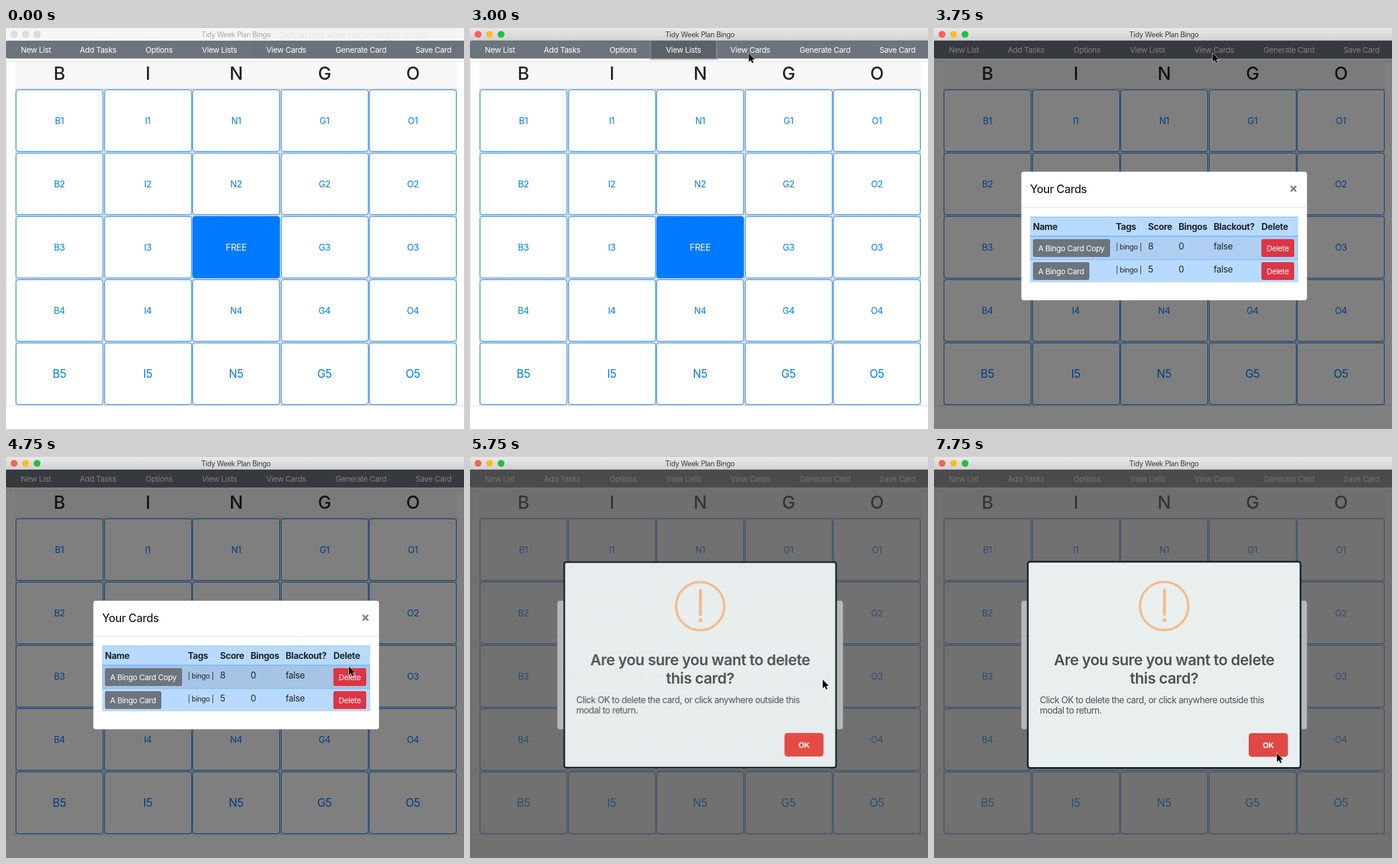
These frames come from a looping animation (796x697 px, 8000 ms). An HTML page:

```html
<!DOCTYPE html>
<html lang="en">
<head>
<meta charset="utf-8">
<title>Bingo cards</title>
<style>
html, body { margin: 0; width: 100%; height: 100%; overflow: hidden; background: #fff; }
svg { display: block; width: 796px; height: 697px; font-family: Inter, "Open Sans", sans-serif; letter-spacing: -.025em; }
.mid { text-anchor: middle; }
.s12 { font-size: 12.5px; }
.s14 { font-size: 13.6px; }
.s16 { font-size: 15.5px; }
.s20 { font-size: 19.4px; }
.s32 { font-size: 31px; font-weight: 500; }
.bold { font-weight: 700; }

/* every pose holds until the next one; one loop is 8 s, 3.125% = 250 ms */
.anim { animation: 8s step-end infinite; }
#hint { animation-name: hint; }
#active { animation-name: active; }
#lists { animation-name: lists; }
#cards { animation-name: cards; }
#backdrop { animation-name: backdrop; }
#modal { animation-name: modal; }
#rowHover { animation-name: rowHover; }
#del { animation-name: del; }
#overlay { animation-name: overlay; }
#alert { animation-name: alert; transform-origin: 400px 361px; }
#ok { animation-name: ok; }
#cursor { animation-name: cursor; }

@keyframes hint {
  0% { opacity: 1; } 3.125% { opacity: .8; } 6.25% { opacity: .6; }
  9.375% { opacity: .4; } 12.5% { opacity: .2; } 15.625%, 100% { opacity: 0; }
}
@keyframes active { 0% { opacity: 0; } 28.125%, 100% { opacity: 1; } }
@keyframes lists { 0% { opacity: 0; } 28.125% { opacity: 1; } 40.625%, 100% { opacity: 0; } }
@keyframes cards { 0% { opacity: 0; } 40.625% { opacity: 1; } 46.875%, 100% { opacity: 0; } }
@keyframes backdrop { 0% { opacity: 0; } 40.625%, 100% { opacity: .5; } }
@keyframes modal {
  0% { opacity: 0; transform: translateY(-50px); }
  43.75% { opacity: .97; transform: translateY(-1px); }
  46.875%, 100% { opacity: 1; transform: none; }
}
@keyframes rowHover { 0% { opacity: 0; } 59.375%, 100% { opacity: .05; } }
@keyframes del { 0% { fill: #dc3545; } 62.5%, 100% { fill: #c82333; } }
@keyframes overlay { 0% { opacity: 0; } 68.75% { opacity: .02; } 71.875%, 100% { opacity: .45; } }
@keyframes alert {
  0% { opacity: 0; transform: scale(.7); }
  68.75% { opacity: .03; transform: scale(.7); }
  71.875% { opacity: .99; transform: scale(.997); }
  75%, 100% { opacity: 1; transform: none; }
}
@keyframes ok { 0% { fill: #e84a44; } 93.75%, 100% { fill: #e04843; } }
@keyframes cursor {
  0% { opacity: 0; transform: translate(500px, 56px); }
  18.75% { opacity: 1; transform: translate(500px, 56px); }
  21.875% { opacity: 1; transform: translate(484.5px, 44px); }
  53.125% { transform: translate(490px, 68px); }
  56.25% { transform: translate(536px, 205px); }
  59.375% { transform: translate(596px, 364px); }
  62.5% { transform: translate(611px, 386px); }
  65.625% { transform: translate(613px, 387px); }
  84.375% { transform: translate(612px, 393px); }
  87.5% { transform: translate(606px, 432px); }
  90.625% { transform: translate(600px, 482px); }
  93.75% { transform: translate(597px, 509px); }
  96.875%, 100% { opacity: 1; transform: translate(596px, 515px); }
}
</style>
</head>
<body>
<svg viewBox="0 0 796 697">
  <defs>
    <linearGradient id="bar" x2="0" y2="1">
      <stop offset="0" stop-color="#e9e9e9"/><stop offset="1" stop-color="#d1d1d1"/>
    </linearGradient>
  </defs>

  <rect width="796" height="697" fill="#fff"/>
  <rect y="22" width="800" height="31" rx="3" fill="#6c757d"/>
  <g id="lists" class="anim">
    <rect x="312" y="19" width="119" height="37" rx="3" fill="#828a91" fill-opacity=".5"/>
    <rect x="315" y="22" width="112" height="31" fill="#5a6268"/>
  </g>
  <g id="cards" class="anim">
    <rect x="424" y="19" width="126" height="37" rx="3" fill="#828a91" fill-opacity=".5"/>
    <rect x="427" y="22" width="120" height="31" fill="#5a6268"/>
  </g>
  <g id="nav" class="mid s14" fill="#fff"></g>

  <rect x=".5" y="58.5" width="802" height="598" rx="4" fill="#fff" stroke="#dfdfdf"/>
  <rect x="16" y="59" width="768" height="47" fill="#f7f7f7"/>
  <rect x="16" y="105" width="768" height="551" fill="#dcdcdc"/>
  <g id="grid" class="mid"></g>

  <rect id="backdrop" class="anim" y="22" width="796" height="675"/>

  <g id="modal" class="anim" fill="#212529">
    <rect x="151.5" y="249.5" width="497" height="224" rx="4.5" fill="#fff" stroke="#000" stroke-opacity=".2"/>
    <text x="167" y="287" class="s20" font-weight="500">Your Cards</text>
    <path d="M620 274.500l9.500 9.500m0-9.500l-9.500 9.500" stroke="#7f7f7f" stroke-width="3"/>
    <rect x="152" y="311" width="497" height="1" fill="#dee2e6"/>
    <rect x="167" y="328" width="466" height="114" fill="#b8daff"/>
    <rect x="167" y="362" width="466" height="40" fill-opacity=".05" fill="#000"/>
    <rect id="rowHover" class="anim" x="167" y="362" width="466" height="40" fill="#000"/>
    <path d="M167 328.500h466M167 402.500h466M167 361.500h466M167 362.500h466" stroke="#7abaff"/>
    <g id="head" class="s16 bold"></g>
    <g id="rows"></g>
  </g>

  <rect id="overlay" class="anim" y="22" width="796" height="675" fill="#616161"/>

  <g id="alert" class="anim" fill="#4f5152">
    <rect x="163" y="182" width="474" height="358.500" rx="4" fill="#e9eeef" stroke="#17202d" stroke-width="3"/>
    <g fill="#f8bb86">
      <circle cx="400" cy="259" r="42" fill="none" stroke="#f8bb86" stroke-width="4"/>
      <rect x="398" y="229" width="5" height="47" rx="2"/>
      <circle cx="400.500" cy="283.500" r="3.500"/>
    </g>
    <g class="mid" font-size="26.200" font-weight="600" letter-spacing="-.52">
      <text x="400" y="362">Are you sure you want to delete</text>
      <text x="400" y="394">this card?</text>
    </g>
    <g class="s16" letter-spacing="-.56">
      <text x="184" y="428">Click OK to delete the card, or click anywhere outside this</text>
      <text x="184" y="446">modal to return.</text>
    </g>
    <rect id="ok" class="anim" x="547" y="480" width="68" height="41" rx="5"/>
    <text x="581" y="506" class="mid s14 bold" fill="#fff">OK</text>
  </g>

  <rect width="796" height="22" fill="#f6f6f6"/>
  <g fill="#dcdcdc" stroke="#d0d0d0" stroke-width=".6">
    <circle cx="14" cy="11" r="6"/><circle cx="34" cy="11" r="6"/><circle cx="54" cy="11" r="6"/>
  </g>
  <text x="399.500" y="16" class="mid s12" fill="#a8a8a8">Tidy Week Plan Bingo</text>
  <g id="hint" class="anim">
    <rect x="427" y="0" width="356" height="53" fill="#000" fill-opacity=".012"/>
    <text x="474" y="17" class="s14" fill="#e5e5e5">Click up here when you're ready to record!</text>
  </g>
  <g id="active" class="anim">
    <rect width="796" height="22" fill="url(#bar)"/>
    <rect y="21" width="796" height="1" fill="#b4b4b4"/>
    <circle cx="14" cy="11" r="6" fill="#ff5f57"/>
    <circle cx="34" cy="11" r="6" fill="#ffbd2e"/>
    <circle cx="54" cy="11" r="6" fill="#1ec43c"/>
    <text x="399.500" y="16" class="mid s12" fill="#3e3e3e">Tidy Week Plan Bingo</text>
  </g>

  <path id="cursor" class="anim" d="M0 0V15L3.500 11.700L5.800 17L8.200 16L5.900 10.800H10.600Z"
    fill="#000" stroke="#fff" stroke-width="1.200" paint-order="stroke"/>
</svg>
<script>
const $ = id => document.getElementById(id);

function add(parent, tag, attrs, label = "") {
  const el = document.createElementNS("http://www.w3.org/2000/svg", tag);
  for (const key in attrs) el.setAttribute(key, attrs[key]);
  el.textContent = label;
  parent.append(el);
  return el;
}

const text = (parent, x, y, label, attrs) => add(parent, "text", { x, y, ...attrs }, label);

function button(parent, x, y, width, fill, label) {
  const box = add(parent, "rect", { x, y, width, height: 31, rx: 3, fill });
  text(parent, x + 9, y + 21, label, { class: "s14", fill: "#fff" });
  return box;
}

const menu = {
  "New List": 52, "Add Tasks": 160, "Options": 266, "View Lists": 371,
  "View Cards": 487, "Generate Card": 617, "Save Card": 743
};
for (const label in menu) text($("nav"), menu[label], 43, label);

[..."BINGO"].forEach((letter, col) => {
  const left = 16 + col * 153.6, mid = left + 76.8;
  text($("grid"), mid, 90, letter, { class: "s32", fill: "#212529" });
  for (let row = 1; row <= 5; row++) {
    const top = 110 * row - 3, free = col === 2 && row === 3;
    add($("grid"), "rect", {
      x: Math.round(left + 1) + .5, y: top + .5, width: 151, height: 107, rx: 4,
      fill: free ? "#007bff" : "#fff", stroke: "#007bff"
    });
    text($("grid"), mid, top + (row === 5 ? 61 : 60), free ? "FREE" : letter + row, {
      class: row === 5 ? "s20" : "s16", fill: free ? "#fff" : "#007bff"
    });
  }
});

const columns = { Name: 172, Tags: 316, Score: 372, Bingos: 425, "Blackout?": 486, Delete: 569 };
for (const label in columns) text($("head"), columns[label], 351, label);

[["A Bingo Card Copy", 134, 8], ["A Bingo Card", 98, 5]].forEach(([name, width, score], i) => {
  const rows = $("rows"), y = 367 + 40 * i;
  button(rows, columns.Name, y, width, "#6c757d", name);
  text(rows, columns.Tags, y + 18, "| bingo |", { class: "s12" });
  text(rows, columns.Score, y + 18, score, { class: "s16" });
  text(rows, columns.Bingos, y + 18, "0", { class: "s16" });
  text(rows, columns["Blackout?"], y + 18, "false", { class: "s16" });
  const del = button(rows, columns.Delete, y, 57, "#dc3545", "Delete");
  if (i === 0) {
    del.id = "del";
    del.classList.add("anim");
  }
});
</script>
</body>
</html>
```
